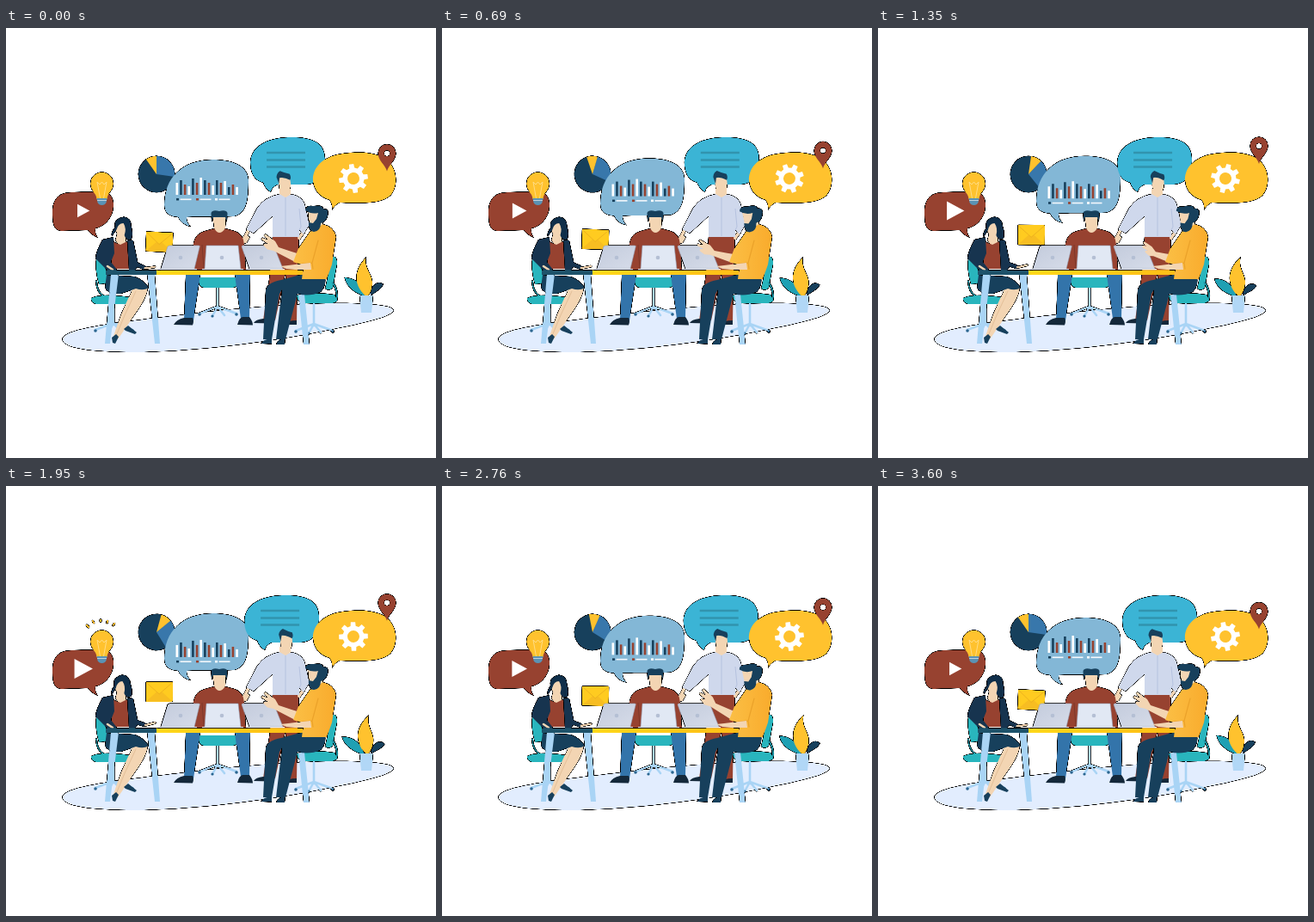
Recreate the animation shown at these times as an HTML page. Size 500 by 500 pixels, loop 3.63 s.

```html
<!DOCTYPE html>
<html lang="en">
<head>
<meta charset="utf-8">
<title>Team meeting</title>
<style>
html, body { margin: 0; width: 100%; height: 100%; overflow: hidden; background: #fff; }
svg { display: block; width: 100vw; height: 100vh; }
.limb { fill: none; stroke-linecap: round; stroke-linejoin: round; }
.navy { fill: #17405c; } .red { fill: #974230; } .skin { fill: #f3d5b3; }
.teal { fill: #29b5bd; } .gold { fill: #ffc22e; } .pale { fill: #a9d4f5; }
.shoe { fill: #14283a; }
.sSkin { stroke: #f3d5b3; } .sPale { stroke: #a9d4f5; }
</style>
</head>
<body>
<svg viewBox="0 0 500 500" xmlns="http://www.w3.org/2000/svg">
<defs>
  <!-- half-covered pixels on the silhouette turn black -->
  <filter id="edge" x="0" y="0" width="500" height="500" filterUnits="userSpaceOnUse" color-interpolation-filters="sRGB">
    <feComponentTransfer in="SourceAlpha" result="rim"><feFuncA type="linear" slope="4" intercept="-.4"/></feComponentTransfer>
    <feComponentTransfer in="SourceGraphic" result="core"><feFuncA type="linear" slope="4" intercept="-3"/></feComponentTransfer>
    <feMerge><feMergeNode in="rim"/><feMergeNode in="core"/></feMerge>
  </filter>
  <linearGradient id="top"><stop offset="0" stop-color="#ffd91a"/><stop offset="1" stop-color="#ffbd16"/></linearGradient>
  <linearGradient id="lid" x2="1" y2="1"><stop offset="0" stop-color="#c3cbdc"/><stop offset="1" stop-color="#d6dce9"/></linearGradient>
  <linearGradient id="shirt"><stop offset="0" stop-color="#fbbf45"/><stop offset="1" stop-color="#f9ab2c"/></linearGradient>
  <g id="base">
    <path class="limb sPale" stroke-width="2.6" d="M0 0V25M0 23L-21 31M0 23L22 31M0 23L-6 34M0 23L8 33"/>
    <g fill="#2b6690"><circle cx="-21" cy="32" r="1.8"/><circle cx="22" cy="32" r="1.8"/><circle cx="-6" cy="34" r="1.6"/></g>
  </g>
</defs>
<g filter="url(#edge)">
  <path fill="#e2edfe" d="M65.500 362C66 350 120 343 200 334C280 324 360 319 402 320C438 321 451 324 451 328.500C449 337 404 346 346 357C285 368 205 377 150 377C98 377 65 372 65.500 362Z"/>

  <!-- pie -->
  <g id="pie">
    <circle cx="175" cy="170" r="21.3" class="navy"/>
    <path id="slice" fill="#3877ab"/>
    <path id="wedge" class="gold"/>
  </g>

  <!-- speech bubbles -->
  <path class="red" d="M54 214C54 203 58 191 76 191L108 190C122 190 126 198 125 208C124 222 114 231 104 233Q103 239 107 244Q98 240 95 235L66 236C55 236 54 228 54 214Z"/>
  <path id="play" fill="#fff" d="M-7 -7.7L7.3 0L-7 7.7Z"/>

  <path id="blue" fill="#83b7d6" d="M184 206C184 174 205 153 240 153C264 153 281 160 282 176C282 197 281 215 266 219C250 220 226 219 210 220Q210 226 215 231Q204 229 200 220C189 219 184 215 184 206Z"/>
  <g id="chart"></g>

  <g id="note">
    <path fill="#3bb4d5" d="M284 156C285 138 302 128 328 127C356 126 371 133 371 152C371 172 364 181 350 182L316 182Q309 185 308 191Q301 187 299 180C288 177 284 168 284 156Z"/>
    <path stroke="#3194ae" stroke-width="2.6" d="M303 145H348M303 153.500H348M303 161.500H348"/>
  </g>

  <path class="gold" d="M357 178C356 165 365 152 385 147C405 143 432 143 444 154C456 165 456 185 447 195C437 205 410 204 388 203Q382 206 379 212Q380 205 376 200C366 197 358 190 357 178Z"/>
  <path id="gear" fill="#fff" fill-rule="evenodd"/>
  <path id="pin" fill="#974230" fill-rule="evenodd" d="M443 166.500C441 159 432.500 154 432.500 145.500A10.500 10.500 0 0 1 453.500 145.500C453.500 154 445 159 443 166.500ZM443 142.500A3.200 3.200 0 1 0 443 148.900A3.200 3.200 0 1 0 443 142.500Z"/>

  <!-- bulb -->
  <path id="rays" class="limb" stroke="#f5b82e" stroke-width="2.600" d="M94 162L96 164M101 157L102 159M110 155.500V157.500M118 157L117.500 159M126 160L124.500 162"/>
  <path class="gold" d="M98 181A13.500 13.500 0 0 1 125 181C125 190 118 191 117.500 199H105.500C105 191 98 190 98 181Z"/>
  <path class="limb" stroke="#ffdc84" stroke-width="1" d="M109.500 198L106 179L109 182L111.500 179L114 182L117 179L113.500 198"/>
  <path fill="#5a92b4" d="M105.500 198H117.500L116.500 203Q115 206 111.500 206Q108 206 106.500 203Z"/>
  <path stroke="#d9e2ea" stroke-width=".8" d="M106 200.500H117"/>

  <g id="mail">
    <rect x="162.500" y="237" width="31.500" height="23.500" rx="1" fill="#ffcb20"/>
    <path fill="#f7bd22" d="M163 260L175 249L178 251L181.500 249L193.500 260Z"/>
    <path fill="none" stroke="#ecb01f" stroke-width=".9" d="M163 238L178.200 251.500L193.500 238"/>
  </g>

  <!-- plant -->
  <path id="leafL" fill="#1fa0b3" d="M419 313C417 299 406 290 393.500 290C396 303 408 309 419 313Z"/>
  <path id="leafR" class="navy" d="M424 312C423 301 431 292 439 298C436 305 430 306 424 312Z"/>
  <path id="leafM" class="gold" d="M420 313C405 301 402 283 419 266C416 280 428 287 426 299C425 307 422 311 420 313Z"/>
  <path fill="#b1d7f6" d="M411 311H427L425 331H413Z"/>

  <!-- standing man -->
  <path class="red" d="M310 241H341L339 282L338 342H327L325 285L313 340H299L307 285Z"/>
  <path class="shoe" d="M288 343Q290 339 299 338H307V343.500ZM324 345Q327 340 338 340V345Z"/>
  <path class="skin" d="M318 187H331V195L325 200L318 196Z"/>
  <g id="headS">
    <path class="skin" d="M317 173L331 175Q333 186 329 191Q323 194 318 186Z"/>
    <path class="navy" d="M315.500 173Q316 168 320 166Q326 169 331 170Q333 174 331 177Q324 173 319 174L318 181Z"/>
  </g>
  <path class="limb sSkin" stroke-width="4" d="M283 233L276 247M346 237L341 244"/>
  <path class="skin" d="M278 240L270 250L273 252L280 250L284 243Z"/>
  <path fill="#cfd8ec" d="M318 193L325 197L332 193Q346 196 348 207L353 229L346 240L341 235V243H310V219L288 239L279 234L292 209Q301 196 318 193Z"/>
  <path fill="none" stroke="#b5c2df" stroke-width="1" d="M325 197V242M341 210L343 231L341 235"/>

  <!-- centre man -->
  <use href="#base" x="246" y="301"/>
  <path class="teal" d="M224 290H270Q271 302 264 302H230Q223 302 224 290Z"/>
  <path fill="#3374aa" d="M209 287H226L218 340H207ZM266 287H284L283 338H273Z"/>
  <path class="shoe" d="M195 345Q198 339 207 337H217Q219 341 217 345.500ZM269 345Q271 337 275 336H283Q287 341 287 345.500Z"/>
  <path class="red" d="M217 281L218 250Q220 239 231 236L242 233Q248 239 255 233L266 236Q276 239 277 252L279 281Z"/>
  <path fill="none" stroke="#7d382a" stroke-width="1" d="M228 252L230 280M269 252L272 280"/>
  <path class="skin" d="M240 219H256L255 233Q248 243 242 233Z"/>
  <path class="navy" d="M239 226L238.500 215Q240 211 248 213Q256 211 257.500 215L257 226L255 220H241Z"/>

  <!-- left chair and woman -->
  <use href="#base" x="125" y="320"/>
  <path class="teal" d="M105 267Q109 262 113 268L119 293Q119 298 108 298Q103 282 105 267Z"/>
  <path class="limb" stroke="#1b8e9d" stroke-width="2" d="M105 294Q106 311 118 313"/>
  <path class="teal" d="M99 314Q110 308 145 313Q148 321 138 321H104Q98 319 99 314Z"/>
  <path class="skin" d="M146 300L165 302Q164 314 150 333L130 362L124 361L134 332L146 306Z"/>
  <path fill="none" stroke="#e3bf98" stroke-width="1" d="M151 306L138 334L128 358"/>
  <path class="navy" d="M124 366L123 360L128 356L131 359L127 367ZM137 350L142 346L152 354L150 356L139 352ZM117 287L150 289Q162 294 166 302Q160 306 151 303L134 309Q118 310 115 302Z"/>
  <path class="skin" d="M129 239L139 241L140 250L133 255L127 247Z"/>
  <path class="red" d="M124 248L133 252L141 248L143 280H122Z"/>
  <path fill="#17344f" d="M125 243L126 262L122 272L129 281L122 286L104 268Q104 261 112 246ZM141 246L148 247L154 276L150 282H143Z"/>
  <path class="limb sSkin" stroke-width="2.600" d="M118 277L124 281"/>
  <g id="hand">
    <path class="limb" stroke="#17344f" stroke-width="5" d="M150 274L160 278"/>
    <path class="limb sSkin" stroke-width="2.800" d="M162 279L173 277"/>
  </g>
  <g id="headW">
    <path class="skin" d="M126.500 230L137 224L141 239Q136 245 131 242Q126 237 126.500 230Z"/>
    <path fill="#102f4a" d="M126 232Q124 222 136 219.500Q145 220 145.500 231Q148 239 146 245Q140 248 137.500 241Q140 233 136 227Q130 227 128 235L123 243Q121 239 126 232Z"/>
  </g>

  <!-- right chair -->
  <use href="#base" x="358" y="321"/>
  <path class="teal" d="M379 266Q386 264 385 275L380 302Q376 307 371 303Z"/>
  <path class="limb" stroke="#1b8e9d" stroke-width="2.500" d="M380 296Q387 307 384 317"/>
  <path class="teal" d="M338 311Q360 306 382 310Q388 318 380 320H346Q338 319 338 311Z"/>

  <!-- table -->
  <path class="pale" d="M122 286H131L121 367H115ZM164 286H173L179 367H173ZM340 310H347L353 368H346Z"/>
  <rect x="116" y="281.300" width="60" height="5.700" fill="#1e536b"/>
  <rect x="175" y="281.300" width="170" height="5.700" fill="url(#top)"/>
  <g fill="url(#lid)" stroke="#97a1b8" stroke-width=".6">
    <path d="M190 253H224Q226 253 225 255L219 280H180L188 254Z"/>
    <path d="M275 253H310L312 255L322 280H283L274 254Z"/>
    <path fill="#e1e8f4" d="M233 253H270L273 280H231Z"/>
  </g>
  <path stroke="#eef1f7" stroke-width="1.200" d="M180 280.600H222M228 280.600H276M281 280.600H324"/>
  <g fill="#b4bfd4"><circle cx="203" cy="267" r="2.300"/><circle cx="251" cy="267" r="2.300"/><circle cx="297" cy="267" r="2.300"/></g>

  <!-- right man -->
  <path class="navy" d="M370 286Q374 300 366 307Q352 313 339 309L325 362H314L321 304L318 309L309 362H299L302 304Q304 296 320 293L342 287Z"/>
  <path class="navy" d="M296 367Q299 362 309 361V367.500ZM314 368Q316 361 325 361L324 368Z"/>
  <g id="arm">
    <path class="skin" d="M345 264L347 274L336 272L311 259L304 257.500L299 252.500L299.500 250.500L304 251L296.500 246L298 243.500L304 246L299.500 241L301.500 239L308 244L313 248L317 255L332 260Z"/>
  </g>
  <path class="skin" d="M354 224H368L370 236L357 239Z"/>
  <path fill="url(#shirt)" d="M353 237L369 228Q382 231 384 243L379 275L373 292H344L346 276L334 272L340 256Z"/>
  <path class="limb" stroke="#eba22a" stroke-width="1.200" d="M363 247L356 273L344 274M356 273L357 280"/>
  <path class="skin" d="M354 273L355 281L336 281L326 280L319 277L328 276L336 275Z"/>
  <g id="headR">
    <path class="skin" d="M351 214L364 212L367 228L361 235L353 231Z"/>
    <path class="navy" d="M348 212Q348 206 357 207Q369 205 369 210Q377 210 374 219Q372 226 366 227Q366 236 358 237Q351 237 352 226L357 227L361 222L363 215Q355 217 348 212Z"/>
  </g>
</g>
</svg>
<script>
const LOOP = 3630, STEP = 30, TAU = Math.PI * 2;
const el = id => document.getElementById(id);
const set = (id, v) => el(id).setAttribute('transform', v);
const mix = (a, b, k) => a + (b - a) * k;

function sector(from, to) {
  const pt = d => {
    const a = d * TAU / 360;
    return `${175 + 21.3 * Math.sin(a)} ${170 - 21.3 * Math.cos(a)}`;
  };
  return `M175 170L${pt(from)}A21.3 21.3 0 0 1 ${pt(to)}Z`;
}
el('slice').setAttribute('d', sector(-1, 98));
el('wedge').setAttribute('d', sector(-35, 0));

function gearPath(teeth) {
  const pts = [], pitch = TAU / teeth;
  for (let i = 0; i < teeth; i++) {
    [[-.31, 12.5], [-.2, 17], [.2, 17], [.31, 12.5]].forEach(([o, r]) => {
      const a = (i + o) * pitch;
      pts.push((r * Math.sin(a)).toFixed(2) + ' ' + (-r * Math.cos(a)).toFixed(2));
    });
  }
  return 'M' + pts.join('L') + 'ZM-7 0A7 7 0 1 0 7 0A7 7 0 1 0 -7 0Z';
}
el('gear').setAttribute('d', gearPath(8));

const tones = ['#fff', '#17405c', '#974230'];
const bar = (x, y, w, h, fill) => `<rect x="${x}" y="${y}" width="${w}" height="${h}" fill="${fill}"/>`;
const heights = [14, 17, 12, 10, 19, 14, 20, 17, 14, 11, 17, 14, 16, 9, 12, 9];
el('chart').innerHTML =
  heights.map((h, i) => bar(197.5 + i * 4.65, 194 - h, 2.6, h, tones[i % 3])).join('') +
  [198, 221, 243].map((x, i) =>
    bar(x, 198, 3, 2.5, tones[[1, 2, 0][i]]) + bar(x + 4.5, 198.5, 13, 1.6, '#f4f8fc')).join('');

// time, angle, reach of the gesturing arm
const gesture = [[0, 0, 1], [690, -9, .94], [1350, -16, .66], [1950, 0, 1],
  [2370, 8, 1], [3150, 2, 1], [LOOP, 0, 1]];
function pose(t) {
  const i = gesture.findIndex(k => k[0] > t);
  const a = gesture[i - 1], b = gesture[i];
  const k = (1 - Math.cos(Math.PI * (t - a[0]) / (b[0] - a[0]))) / 2;
  return [mix(a[1], b[1], k), mix(a[2], b[2], k)];
}

function draw(t) {
  const p = t / LOOP;
  const e = (1 - Math.cos(TAU * p)) / 2;
  const nod = (1 - Math.cos(2 * TAU * p)) / 2;
  const [angle, reach] = pose(t);
  set('pie', `rotate(${51 * e} 175 170)`);
  set('play', `translate(90 212.5) scale(${mix(1, 1.5, e)})`);
  set('blue', `translate(0 ${-5 * e})`);
  set('chart', `translate(0 ${5 * e})`);
  set('note', `translate(${-7 * e} 0)`);
  set('gear', `translate(404 175) rotate(${180 * p - 8.5})`);
  set('pin', `translate(0 ${-10 * e})`);
  set('mail', `translate(0 ${-9.7 * e}) rotate(${2.5 * (1 - e)} 178 249)`);
  set('leafM', `rotate(${4 * e} 420 313)`);
  set('leafL', `translate(${-2 * e} 0) rotate(${-3 * e} 419 313)`);
  set('leafR', `rotate(${7 * e} 424 312)`);
  set('headS', `translate(${e} 0) rotate(${mix(-3, 2, e)} 324 192)`);
  set('headW', `rotate(${mix(2, -2, e)} 134 245)`);
  set('hand', `rotate(${mix(2, -4, e)} 150 274)`);
  set('headR', `rotate(${-6 * nod} 362 234)`);
  set('arm', `translate(343 268) rotate(${angle}) scale(${reach} 1) translate(-343 -268)`);
  el('rays').style.display = t >= 1530 && t < 2130 ? '' : 'none';
}

const start = performance.now();
function tick() {
  const t = (performance.now() - start) % LOOP;
  draw(Math.floor(t / STEP) * STEP);
  requestAnimationFrame(tick);
}
tick();
</script>
</body>
</html>
```
